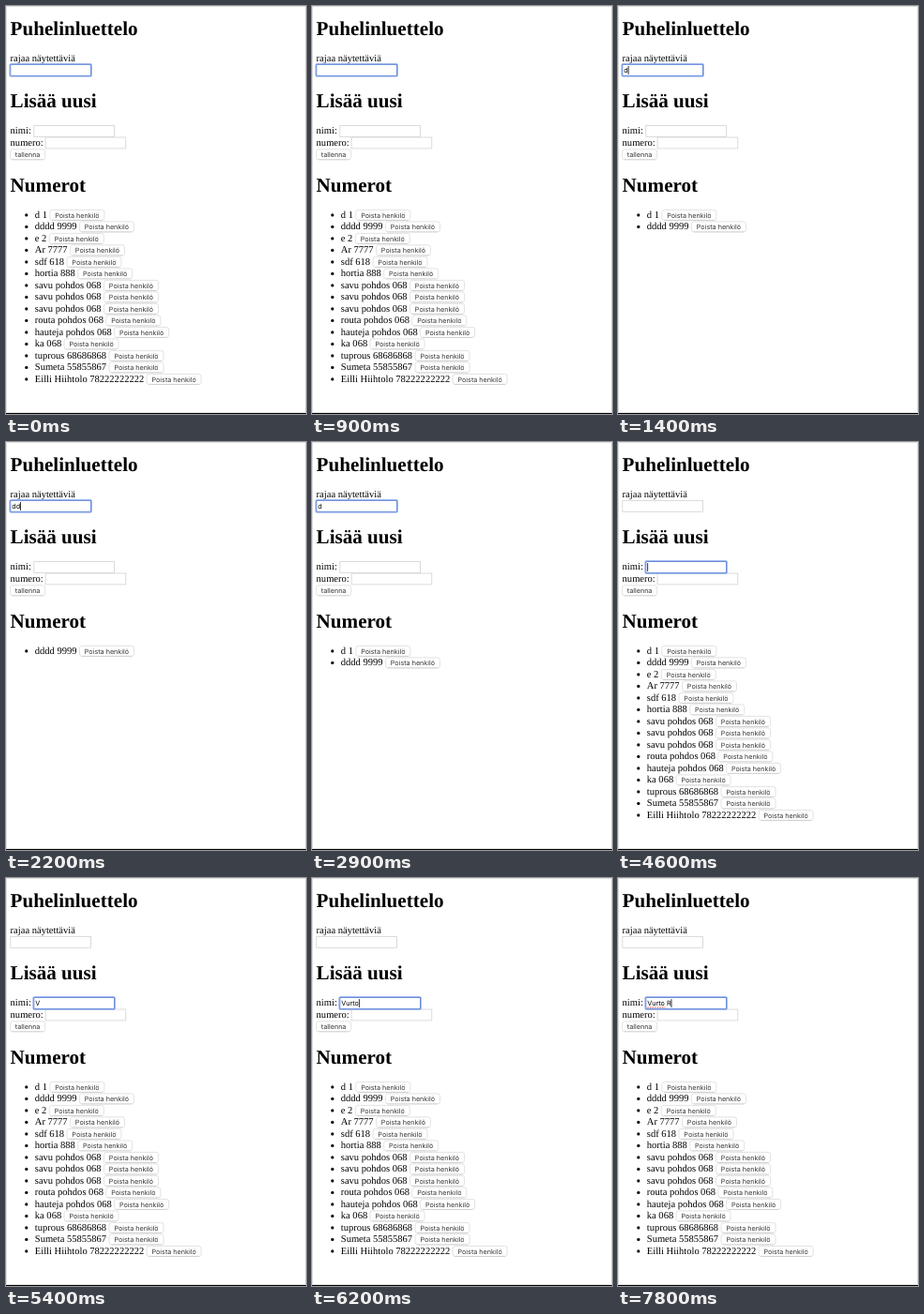
Recreate the animation shown at these times as an HTML page. Size 320 px wide and 435 px high, loop 8 s.

```html
<!DOCTYPE html>
<html lang="fi">
<meta charset="utf-8">
<title>Puhelinluettelo</title>
<style>
html, body { margin: 0; width: 100%; height: 100%; overflow: hidden; background: #fff; }
svg { display: block; width: 320px; height: 435px; }
text { font: 10.54px "Liberation Serif", Times, serif; text-rendering: geometricPrecision; white-space: pre; }
.h1 { font-size: 21.1px; font-weight: bold; }
.ui { font: 7.2px Inter, "Noto Sans", sans-serif; }
.mid { text-anchor: middle; fill: #333; }
.window { fill: #fff; stroke: #ddd; }
.box { fill: #fff; stroke: #d2d2d2; stroke-width: .8; }
.halo { fill: none; stroke: #a3b9ee; stroke-width: 3; }
.focus { fill: #fff; stroke: #6c8fdc; stroke-width: 1; }
.btn { fill: #fff; stroke: #d6d6d6; stroke-width: .7; }
.shade { stroke: #c4c4c4; stroke-width: .6; }
.misspelt { stroke: #e8453c; stroke-width: 1.1; stroke-dasharray: 1.5 1.1; }
</style>
<svg viewBox="0 0 320 435">
  <rect width="320" height="435"/>
  <rect class="window" x=".5" y=".5" width="319" height="433"/>
  <g transform="translate(-.4 -.5)">
    <g id="page"></g>
    <g id="live"></g>
  </g>
</svg>
<script>
const LOOP = 8000, ROW = 12.5;
const page = document.getElementById('page'), live = document.getElementById('live');

const people = [
  'd 1', 'dddd 9999', 'e 2', 'Ar 7777', 'sdf 618', 'hortia 888',
  'savu pohdos 068', 'savu pohdos 068', 'savu pohdos 068',
  'routa pohdos 068', 'hauteja pohdos 068', 'ka 068',
  'tuprous 68686868', 'Sumeta 55855867', 'Eilli Hiihtolo 78222222222'
];

const fields = {
  filter: { x: 5.2, y: 62.9 },
  name: { x: 30.2, y: 128 },
  number: { x: 42.5, y: 140.5 }
};

// time, focused field, its text, caret shown
const steps = [
  [0, 'filter', '', 0], [400, 'filter', '', 1], [900, 'filter', '', 0],
  [1400, 'filter', 'd', 1], [1900, 'filter', 'd', 0],
  [2200, 'filter', 'dd', 1], [2700, 'filter', 'dd', 0],
  [2900, 'filter', 'd', 0], [3200, 'filter', '', 1],
  [3600, 'name', '', 1], [4100, 'name', '', 0], [4600, 'name', '', 1],
  [4900, 'name', 'V', 1], [5400, 'name', 'V', 0],
  [5500, 'name', 'Vu', 1], [5700, 'name', 'Vur', 1], [5900, 'name', 'Vurt', 1],
  [6200, 'name', 'Vurto', 1], [6700, 'name', 'Vurto', 0],
  [7200, 'name', 'Vurto ', 1], [7500, 'name', 'Vurto R', 1]
];

function add(parent, tag, attrs, content = '') {
  const el = document.createElementNS('http://www.w3.org/2000/svg', tag);
  for (const key in attrs) el.setAttribute(key, attrs[key]);
  el.textContent = content;
  return parent.appendChild(el);
}

// Returns the x where the text ends
function label(parent, x, y, content, cls = '') {
  return x + add(parent, 'text', { x, y, class: cls }, content).getComputedTextLength();
}

function button(parent, x, base, width, content) {
  const y = base - 8.4, height = 11;
  add(parent, 'rect', { x, y, width, height, rx: 2.4, class: 'btn' });
  add(parent, 'path', { d: `M${x + 2} ${y + height}h${width - 4}`, class: 'shade' });
  label(parent, x + width / 2, base, content, 'ui mid');
}

function input(parent, { x, y }, focused) {
  const size = { x, y, width: 85.7, height: 11.9 };
  if (focused) add(parent, 'rect', { ...size, rx: 1, class: 'halo' });
  add(parent, 'rect', { ...size, class: focused ? 'focus' : 'box' });
}

function drawPage() {
  label(page, 5, 31, 'Puhelinluettelo', 'h1');
  label(page, 5, 59.7, 'rajaa näytettäviä');
  label(page, 5, 108, 'Lisää uusi', 'h1');
  label(page, 5, 136.8, 'nimi:');
  label(page, 5, 149.2, 'numero:');
  button(page, 5, 161.7, 37, 'tallenna');
  label(page, 5, 198, 'Numerot', 'h1');
}

function drawLive([, focus, typed, caret]) {
  live.replaceChildren();
  for (const id in fields) if (id !== focus) input(live, fields[id]);
  const { x, y } = fields[focus];
  input(live, fields[focus], true);
  const end = label(live, x + 1.5, y + 8.8, typed, 'ui');
  if (caret) add(live, 'rect', { x: end, y: y + 1.6, width: .8, height: 8.8 });
  if (typed.includes(' '))
    add(live, 'path', { d: `M${x + 1.5} ${y + 10.5}h19`, class: 'misspelt' });

  const prefix = focus === 'filter' ? typed : '';
  people.filter(p => p.startsWith(prefix)).forEach((person, i) => {
    const base = 226.3 + i * ROW;
    add(live, 'circle', { cx: 22.2, cy: base - 2.9, r: 1.6 });
    const right = label(live, 31.2, base, person);
    button(live, right + 2.9, base, 58, 'Poista henkilö');
  });
}

let shown;
function tick() {
  const t = performance.now() % LOOP;
  const step = steps.findLast(s => s[0] <= t);
  if (step !== shown) drawLive(shown = step);
  requestAnimationFrame(tick);
}

drawPage();
tick();
</script>
</html>
```
